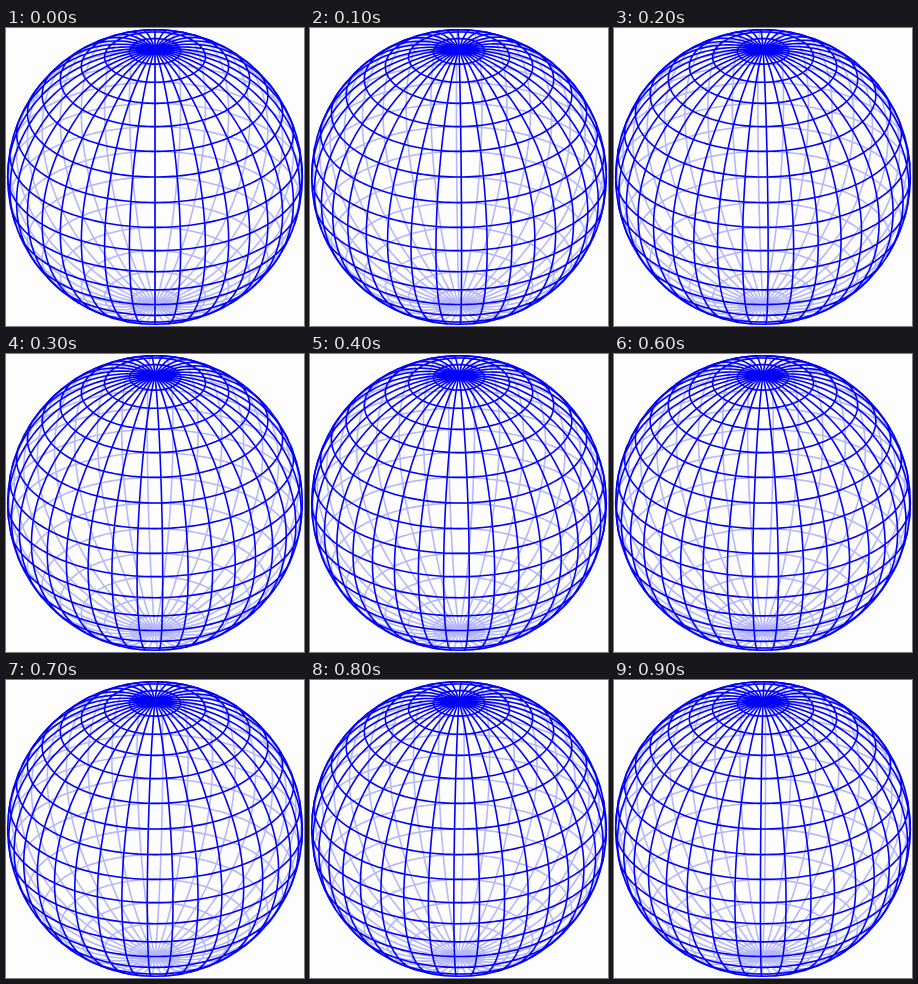
Write an HTML page with a canvas that moves like this. It is 298 px wide and 298 px high and loops after 1 s.

```html
<!DOCTYPE html>
<html lang="en">
<head>
<meta charset="utf-8">
<title>Turning wireframe globe</title>
<style>
  html, body { margin: 0; width: 100%; height: 100%; overflow: hidden; background: #fdfdfd; }
  canvas { display: block; width: 298px; height: 298px; }
</style>
</head>
<body>
<canvas id="stage" width="298" height="298"></canvas>
<script>
const ctx = document.getElementById('stage').getContext('2d');
const RAD = Math.PI / 180;
const CENTER = 149, RADIUS = 147.3, TILT = 30 * RAD;
const GRID = 10, STEP = 2;            // degrees
const LOOP = 1000, FRAME = 100;       // ms
const FRONT = '#0202fc', BACK = '#b6b6fa';

// Orthographic projection; depth > 0 faces the viewer.
function project(lat, lon) {
  const a = lat * RAD, b = lon * RAD;
  const up = Math.sin(a), out = Math.cos(a) * Math.cos(b);
  return {
    x: CENTER + RADIUS * Math.cos(a) * Math.sin(b),
    y: CENTER - RADIUS * (up * Math.cos(TILT) - out * Math.sin(TILT)),
    depth: up * Math.sin(TILT) + out * Math.cos(TILT)
  };
}

// Adds a curve to the front or back path, cut at the horizon.
function trace(paths, from, to, pointAt) {
  let prev = pointAt(from), current = null;
  for (let d = from + STEP; d <= to; d += STEP) {
    const next = pointAt(d);
    const path = prev.depth + next.depth >= 0 ? paths.front : paths.back;
    if (path !== current) path.moveTo(prev.x, prev.y);
    path.lineTo(next.x, next.y);
    current = path;
    prev = next;
  }
}

function draw(turn) {
  const paths = { front: new Path2D(), back: new Path2D() };
  for (let lon = 0; lon < 360; lon += GRID)
    trace(paths, -90, 90, lat => project(lat, lon + turn));
  for (let lat = -80; lat <= 80; lat += GRID)
    trace(paths, 0, 360, lon => project(lat, lon));

  ctx.fillStyle = '#fdfdfd';
  ctx.fillRect(0, 0, 298, 298);
  ctx.lineJoin = 'round';
  ctx.lineWidth = 1.6;
  ctx.strokeStyle = BACK;
  ctx.stroke(paths.back);
  ctx.strokeStyle = FRONT;
  ctx.stroke(paths.front);
  ctx.beginPath();
  ctx.arc(CENTER, CENTER, RADIUS, 0, 2 * Math.PI);
  ctx.stroke();
}

let shown = -1;
function tick() {
  const step = Math.floor(performance.now() % LOOP / FRAME);
  if (step !== shown) draw(shown = step);   // one degree per step
  requestAnimationFrame(tick);
}
tick();
</script>
</body>
</html>
```
